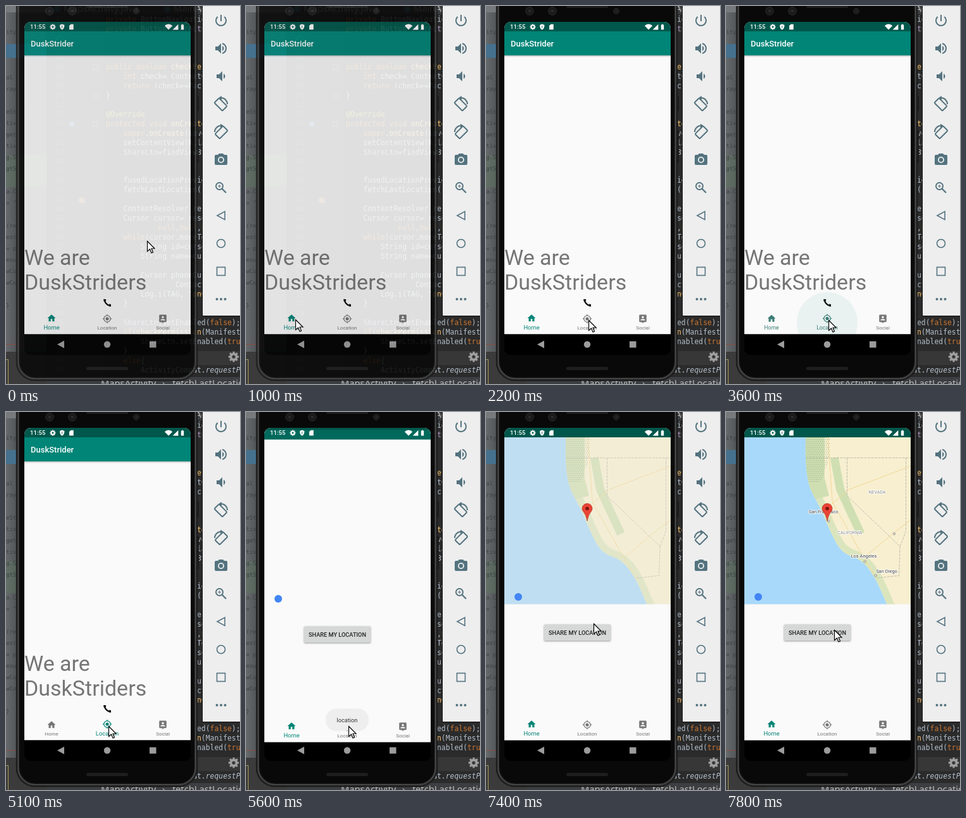
An HTML page with a canvas that plays this animation: 370 by 597 pixels, repeating every 8 s.

```html
<!DOCTYPE html>
<html lang="en">
<head>
<meta charset="utf-8">
<title>Phone emulator</title>
<style>
html, body { margin: 0; width: 100%; height: 100%; overflow: hidden; background: #2b2b2b; }
canvas { display: block; width: 370px; height: 597px; }
</style>
</head>
<body>
<canvas id="stage" width="370" height="597"></canvas>
<script>
const W = 370, H = 597, LOOP = 8000, STEP = 100, TAU = Math.PI * 2;
const TEAL = '#008577', DARK_TEAL = '#00574b', PAPER = '#fafafa', GREY = '#757575', TOOL = '#54737f';
const SCREEN = { x: 29, y: 25, w: 263, bottom: 518.5 };
const stage = document.getElementById('stage').getContext('2d');

const clamp = v => Math.max(0, Math.min(1, v));
const ramp = (t, from, to) => clamp((t - from) / (to - from));
const mix = (a, b, k) => a + (b - a) * k;

function layer() {
  const c = document.createElement('canvas');
  c.width = W; c.height = H;
  return c.getContext('2d');
}
function box(g, x, y, w, h, color) { g.fillStyle = color; g.fillRect(x, y, w, h); }
function disc(g, x, y, r, color) {
  g.fillStyle = color; g.beginPath(); g.arc(x, y, r, 0, TAU); g.fill();
}
function arc(g, x, y, r, from, to, width) {
  g.lineWidth = width; g.beginPath(); g.arc(x, y, r, from, to); g.stroke();
}
function ring(g, x, y, r, color, width) { g.strokeStyle = color; arc(g, x, y, r, 0, TAU, width); }
function path(g, points, close) {
  g.beginPath();
  points.forEach(p => g.lineTo(...p));
  if (close) g.closePath();
}
function shape(g, points, color) { path(g, points, true); g.fillStyle = color; g.fill(); }
function line(g, points, color, width) {
  path(g, points); g.strokeStyle = color; g.lineWidth = width; g.stroke();
}
function rounded(g, x, y, w, h, r) { g.beginPath(); g.roundRect(x, y, w, h, r); }
function hole(g, x, y, r) { g.moveTo(x + r, y); g.arc(x, y, r, 0, TAU); }
function spin(g, x, y, count, draw) {
  for (let i = 0; i < count; i++) {
    g.save(); g.translate(x, y); g.rotate(i * TAU / count); draw(); g.restore();
  }
}
function label(g, str, x, y, font, color, align = 'left') {
  g.font = font; g.fillStyle = color; g.textAlign = align; g.fillText(str, x, y);
}

// Icons live on a 24-unit grid; c is their colour.
function speaker(g, x, c) {
  shape(g, [[x, 9], [x + 4, 9], [x + 9, 4], [x + 9, 20], [x + 4, 15], [x, 15]], c);
  g.beginPath(); g.arc(x + 9, 12, 4.5, -1.1, 1.1); g.fill();
  box(g, x + 9, 4, 2, 16, '#eeeeee');
}
const ICONS = {
  home(g, c) {
    shape(g, [[2, 12], [12, 3], [22, 12]], c);
    box(g, 5, 11, 5, 9, c); box(g, 14, 11, 5, 9, c); box(g, 9, 11, 6, 3, c);
  },
  locate(g, c) {
    disc(g, 12, 12, 4, c);
    ring(g, 12, 12, 8, c, 2);
    spin(g, 12, 12, 4, () => box(g, -1, -11, 2, 3, c));
  },
  social(g, c) {
    rounded(g, 3, 2, 18, 18, 2);
    hole(g, 12, 8, 2.7);
    g.moveTo(6, 16); g.bezierCurveTo(6, 11, 18, 11, 18, 16); g.closePath();
    g.fill('evenodd');
    shape(g, [[9, 20], [15, 20], [12, 23]], c);
  },
  call(g) {
    arc(g, 21, 3, 15.5, Math.PI * .5, Math.PI, 3.5);
    for (const a of [.5, .91]) arc(g, 21, 3, 15, Math.PI * a, Math.PI * (a + .09), 6);
  },
  power(g, c) { arc(g, 12, 12, 8, -.85, Math.PI + .85, 2); box(g, 11, 3, 2, 10, c); },
  louder(g, c) { speaker(g, 3, c); arc(g, 12, 12, 8, -1.3, 1.3, 2); },
  quieter(g, c) { speaker(g, 5, c); },
  camera(g, c) {
    shape(g, [[7, 4], [9, 2], [15, 2], [17, 4]], c);
    rounded(g, 2, 4, 20, 16, 2); hole(g, 12, 12, 5); hole(g, 12, 12, 3.2);
    g.fill('evenodd');
  },
  zoom(g, c) {
    ring(g, 9.5, 9.5, 5.5, c, 2);
    line(g, [[13.5, 13.5], [20, 20]], c, 2.3);
    box(g, 7, 9, 5, 1, c); box(g, 9, 7, 1, 5, c);
  },
  gear(g, c) {
    ring(g, 12, 12, 6, c, 5);
    spin(g, 12, 12, 8, () => box(g, -2, -11, 4, 4, c));
  },
  shield(g) {
    g.beginPath(); g.moveTo(12, 1); g.lineTo(21, 5);
    g.quadraticCurveTo(21, 19, 12, 23); g.quadraticCurveTo(3, 19, 3, 5);
    g.rect(11, 7, 2, 10); g.fill('evenodd');
  },
  card(g, c) { shape(g, [[10, 2], [20, 2], [20, 22], [4, 22], [4, 8]], c); },
  battery(g, c) { box(g, 10, 2, 4, 2, c); box(g, 7, 4, 10, 18, c); },
  wifi(g) { g.beginPath(); g.moveTo(12, 22); g.arc(12, 22, 20, Math.PI * 1.25, Math.PI * 1.75); g.fill(); },
  signal(g, c) { shape(g, [[2, 22], [22, 22], [22, 2]], c); }
};
function icon(g, name, x, y, size, color) {
  g.save();
  g.translate(x - size / 2, y - size / 2);
  g.scale(size / 24, size / 24);
  g.fillStyle = g.strokeStyle = color;
  ICONS[name](g, color);
  g.restore();
}

const CODE = `private BottomNavigationView nav;
private Button ShareLtn;



public boolean checkPermission(
    int check= ContextCompat.check
    return (check==PackageManager
}

@Override
protected void onCreate(Bundle
    super.onCreate(savedInstance
    setContentView(R.layout.maps
    ShareLtn=findViewById(R.id.b


    fusedLocationProviderClient=
    fetchLastLocation();

    ContentResolver resolver=get
    Cursor cursor= resolver.query
            null,null,null,null
    while(cursor.moveToNext()){
        String id=cursor.getStr
        String name=cursor.getS

        Cursor phoneCursor=reso
                ContactsContract
        Log.i(TAG, "onCreate: C
    }

    ShareLtn.setEnabled(false);
    if(checkPermission(Manifest.pe
        ShareLtn.setEnabled(true);
    }
    else{
        ActivityCompat.requestPermis`.split('\n');
const KEYWORD = /^(private|public|protected|boolean|int|return|void|super|null|while|if|else|true|false)$/;
const CODE_FONT = '11.4px "DejaVu Sans Mono", monospace';
const UI_FONT = '14.7px "Noto Sans", sans-serif';

function tokenColor(s) {
  if (s[0] === '@') return '#bbb529';
  if (KEYWORD.test(s)) return '#cc7832';
  if (/^(checkPermission|onCreate)$/.test(s)) return '#ffc66d';
  return s === 'ShareLtn' ? '#b39bc4' : '#b4c0cc';
}
function drawCode(g) {
  CODE.forEach((text, row) => {
    const y = 22 + row * 14.97;
    let x = 158;
    label(g, row + 43, 78, y, CODE_FONT, '#55585a');
    for (const token of text.match(/@?\w+|\W+/g) || []) {
      label(g, token, x, y, (token.startsWith('request') ? 'italic ' : '') + CODE_FONT, tokenColor(token));
      x += g.measureText(token).width;
    }
    if (/^(public|protected|\})/.test(text)) {
      g.strokeStyle = '#6b6b6b'; g.lineWidth = 1;
      g.strokeRect(137.5, Math.round(y) - 3.5, 7, 7);
    }
  });
}
function drawSideWindow(g) {
  const fade = g.createLinearGradient(0, 0, 24, 0);
  fade.addColorStop(0, '#66696b'); fade.addColorStop(1, '#4b4e50');
  box(g, 0, 0, 64, 546, fade);
  box(g, 0, 0, 64, 10, '#767a7c');
  box(g, 0, 60, 64, 22, '#45718f');
  box(g, 0, 236, 64, 50, 'rgba(90,120,95,.4)');
  'ity,,,,al,ray,,eState,tivity,getCo,tivity,g.Sta,gtStr,,a.Co,= ",,(res,estNe,= ph,esult,wCon,wCon,,}'.split(',')
    .forEach((s, i) => label(g, s, 0, 42 + i * 18, '9px "DejaVu Sans Mono", monospace', '#3c4042'));
  box(g, 0, 534, 64, 1, '#8b4a44');
  box(g, 0, 546, 64, 51, '#3b3b3b');
  g.strokeStyle = '#a89b55'; g.lineWidth = 1; g.strokeRect(-5.5, 558.5, 9, 50);
}
function drawEditor(g) {
  g.textBaseline = 'middle';
  box(g, 0, 0, W, H, '#2b2b2b');
  box(g, 64, 0, 90, H, '#313335');
  box(g, 64, 0, W, 13, '#3c3f41');
  for (const [name, x] of [['MapsActivity.java', 91], ['MainActivity', 265]]) {
    disc(g, x - 10, 5, 5, '#4a7f92');
    label(g, name, x, 5, UI_FONT, '#bbb');
  }
  drawCode(g);
  disc(g, 104, 186, 4, '#4a78a0');
  disc(g, 120, 307, 5, '#8f6b45');
  box(g, 300, 545, 70, 22, '#373737');
  icon(g, 'gear', 360, 554, 18, '#a0a0a0');
  box(g, 64, 586, W, 11, '#3c3f41');
  label(g, 'MapsActivity', 150, 597, UI_FONT, '#bbb');
  label(g, '›', 247, 597, UI_FONT, '#bbb');
  label(g, 'fetchLastLocation()', 263, 597, UI_FONT, '#bbb');
  drawSideWindow(g);
}

function drawRotateTool(g, y, flip) {
  g.save();
  g.translate(340, y); g.scale(flip, 1);
  g.strokeStyle = TOOL;
  arc(g, 0, 0, 10, -Math.PI / 2, 0, 2);
  shape(g, [[1, -13], [-4, -10], [1, -7]], TOOL);
  g.rotate(Math.PI / 4);
  rounded(g, -9, -4.5, 18, 10.5, 1.5); g.stroke();
  g.restore();
}
function drawToolbar(g) {
  box(g, 310, 0, 60, 490, '#111');
  box(g, 311, 0, 59, 489, '#eeeeee');
  const row = i => 23 + i * 44;
  ['power', 'louder', 'quieter', '', '', 'camera', 'zoom'].forEach((name, i) => {
    if (name) icon(g, name, 340, row(i), 24, TOOL);
  });
  drawRotateTool(g, row(3), 1);
  drawRotateTool(g, row(4), -1);
  g.strokeStyle = TOOL; g.lineWidth = 1.6;
  path(g, [[334, 331], [346, 324.5], [346, 337.5]], true); g.stroke();
  ring(g, 340, row(8), 6.5, TOOL, 1.6);
  g.strokeRect(333.5, 412.5, 13, 13);
  for (const dx of [-6.500, 0, 6.500]) disc(g, 340 + dx, row(10), 2, TOOL);
}

function drawBody(g) {
  box(g, 302, 142, 3, 24, '#1c1c1c');
  box(g, 302, 196, 3, 52, '#1c1c1c');
  rounded(g, 16, -60, 287, 652, 30);
  g.fillStyle = '#090909'; g.fill();
  ['#1a1a1a', '#383838', '#585858', '#151515'].forEach((color, i) => {
    const inset = .5 + i * 1.6;
    rounded(g, 16 + inset, -60, 287 - inset * 2, 652 - inset, 30 - inset);
    g.strokeStyle = color; g.lineWidth = 1.4; g.stroke();
  });
  for (const x of [69, 105, 206]) {
    const r = x > 200 ? 4.5 : 6.3;
    disc(g, x, 8, r, '#191919');
    ring(g, x, 8, r, '#2c2c2c', 1);
    disc(g, x, 8, r * .4, '#28282e');
  }
  for (const y of [-2, 570]) {
    rounded(g, 127, y, 66, 5, 2.5); g.fillStyle = '#1e1e1e'; g.fill();
  }
}

function drawTab(g, name, text, x, active) {
  const color = `rgb(${[0, 133, 119].map(v => Math.round(mix(117, v, active)))})`;
  icon(g, name, x, 494 - active, 15.4, color);
  label(g, text, x, 508.7, `${mix(8, 9.4, active)}px Roboto, sans-serif`, color, 'center');
}
function drawTabs(g, moved) {
  drawTab(g, 'home', 'Home', 72, 1 - moved);
  drawTab(g, 'locate', 'Location', 160, moved);
  drawTab(g, 'social', 'Social', 248, 0);
}
function drawPage(g, barColor) {
  box(g, SCREEN.x, SCREEN.y, SCREEN.w, SCREEN.bottom - SCREEN.y, PAPER);
  box(g, SCREEN.x, SCREEN.y, SCREEN.w, 15.5, barColor);
}

function drawHome(g, t) {
  drawPage(g, DARK_TEAL);
  box(g, SCREEN.x, 40, SCREEN.w, 38, TEAL);
  const shadow = g.createLinearGradient(0, 78, 0, 81);
  shadow.addColorStop(0, 'rgba(0,0,0,.25)'); shadow.addColorStop(1, 'rgba(0,0,0,0)');
  box(g, SCREEN.x, 78, SCREEN.w, 3, shadow);
  label(g, 'DuskStrider', 39, 60.5, '500 13px Roboto, sans-serif', '#fff');
  g.textBaseline = 'alphabetic';
  ['We are', 'DuskStriders'].forEach((s, i) => label(g, s, 29, 409 + i * 39, '34px Roboto, sans-serif', GREY));
  g.textBaseline = 'middle';
  icon(g, 'call', 160, 469, 15.4, '#000');
  const ripple = t < 3100 ? 0 : 1 - ramp(t, 3500, 3700);
  disc(g, 160, 500, 48, `rgba(0,133,119,${.13 * ripple})`);
  box(g, SCREEN.x, SCREEN.bottom, SCREEN.w, 33, '#000');
  drawTabs(g, t < 3100 ? 0 : t < 5100 ? .5 : 1);
}

// Projects longitude and latitude onto the map area.
const geo = (lon, lat) => [154 + (lon + 122.42) * 15.5, 157 + (37.77 - lat) * 20];
const COAST = [geo(-124.2, 43.8), geo(-124.4, 40.4), geo(-122.6, 37.9), geo(-121.9, 36.5),
  geo(-120.6, 34.5), geo(-118.6, 34), geo(-117.2, 32.7), geo(-115.8, 30.2)];

function coastLine(g) {
  g.beginPath(); g.moveTo(...COAST[0]);
  COAST.slice(1).forEach((p, i) => {
    const next = COAST[i + 2] || p;
    g.quadraticCurveTo(...p, mix(p[0], next[0], .5), mix(p[1], next[1], .5));
  });
}
function drawBorders(g) {
  const corner = geo(-114.6, 35), color = '#b4b0a4';
  g.setLineDash([4, 1.5]);
  line(g, [geo(-125, 42), geo(-113, 42)], color, .8);
  line(g, [geo(-120, 42), geo(-120, 39), corner, geo(-114.7, 32.7), geo(-117.1, 32.5)], color, .8);
  line(g, [geo(-114, 42), geo(-114, 36.2), corner], color, .8);
  g.setLineDash([]);
}
function drawTerrain(g) {
  box(g, 0, 0, W, H, '#a8d9fb');
  coastLine(g);
  g.lineTo(300, 310); g.lineTo(300, 30); g.closePath();
  g.fillStyle = '#f7efd0'; g.fill();
  g.save(); g.clip();
  coastLine(g); g.strokeStyle = '#dbe5bd'; g.lineWidth = 22; g.stroke();
  line(g, [geo(-123.4, 44), geo(-123.4, 40.3), geo(-122.9, 38.8)], '#cfdfb2', 34);
  line(g, [geo(-121.3, 42), geo(-120.7, 39.5), geo(-118.6, 36)], '#cfdfb2', 13);
  for (let y = 40, row = 0; y < 112; y += 3, row++)
    for (let x = 122 + row % 2 * 1.5; x < 163 - Math.max(0, y - 70) * .35; x += 3)
      box(g, x, y, 1.1, 1.1, '#8fae86');
  const road = '#f4d694';
  line(g, [geo(-122, 44), geo(-121.5, 38.5), geo(-118.3, 34.1), geo(-117.1, 32.6)], road, 1);
  line(g, [geo(-118.3, 34.1), geo(-115.2, 36.1), geo(-113, 37.4)], road, 1);
  line(g, [geo(-122.4, 37.8), geo(-119.8, 39.5), geo(-113, 41.5)], road, 1);
  drawBorders(g);
  g.restore();
}
function drawPlaces(g) {
  g.lineJoin = 'round'; g.lineWidth = 2; g.textAlign = 'center';
  g.strokeStyle = 'rgba(255,255,255,.85)';
  for (const [name, x, y] of [['San Francisco', 154, 157.5], ['NEVADA', 239, 126.5],
    ['CALIFORNIA', 196, 190.5], ['Los Angeles', 218, 228], ['San Diego', 254, 252]]) {
    const state = name === name.toUpperCase();
    g.font = `${state ? 7 : 7.5}px Roboto, sans-serif`;
    g.fillStyle = state ? '#8a8a8a' : '#444';
    g.strokeText(name, x, y); g.fillText(name, x, y);
  }
  for (const [x, y] of [geo(-121.9, 37), geo(-118.2, 33.8), geo(-117.1, 32.7), geo(-115.2, 36)]) {
    disc(g, x, y, 1.6, '#fff'); ring(g, x, y, 1.6, '#666', .8);
  }
}
function drawPin(g) {
  g.fillStyle = '#ea4335'; g.strokeStyle = '#b5281d'; g.lineWidth = .7;
  g.beginPath();
  g.arc(160, 152.5, 8, Math.PI * .9, Math.PI * .1);
  g.quadraticCurveTo(161, 163, 160, 172);
  g.quadraticCurveTo(159, 163, 152.4, 155);
  g.closePath(); g.fill(); g.stroke();
  disc(g, 160, 152.5, 2.8, '#7d150d');
}

function drawMapPage(g, t) {
  drawPage(g, t < 5700 ? '#00695c' : DARK_TEAL);
  const tiles = ramp(t, 7200, 7500), places = ramp(t, 7400, 7600);
  if (t >= 6100) box(g, SCREEN.x, 40, SCREEN.w, 263.5, '#ece9e1');
  if (tiles) {
    g.save();
    g.beginPath(); g.rect(SCREEN.x, 40, SCREEN.w, 263.5); g.clip();
    g.globalAlpha = tiles; g.drawImage(terrain.canvas, 0, 0);
    g.globalAlpha = places; drawPlaces(g);
    g.restore();
  }
  if (t >= 7000) drawPin(g);
  disc(g, 51, 292, 6, '#4285f4');
  g.save();
  g.shadowColor = 'rgba(0,0,0,.4)'; g.shadowBlur = 3; g.shadowOffsetY = 1;
  rounded(g, 92, 335.5, 105, 25.5, 1.5);
  g.fillStyle = '#d6d7d7'; g.fill();
  g.restore();
  label(g, 'SHARE MY LOCATION', 144.5, 349, '500 9.2px Roboto, sans-serif', '#222', 'center');
  drawTabs(g, 0);
}

function drawSystemBars(g) {
  label(g, '11:55', 38, 33.5, '500 9.6px Roboto, sans-serif', '#fff');
  ['gear', 'shield', 'card'].forEach((name, i) => icon(g, name, 74 + i * 14.7, 33, 10, '#fff'));
  ['wifi', 'signal', 'battery'].forEach((name, i) => icon(g, name, 257 + i * 11, 33, 10.5, '#fff'));
  const key = '#9c9c9c';
  shape(g, [[81, 534.5], [92, 528.5], [92, 540.5]], key);
  disc(g, 160, 534.5, 5.2, key);
  box(g, 227, 529.5, 10.5, 10, key);
}
function drawToast(g, alpha) {
  g.save();
  g.globalAlpha = alpha;
  g.shadowColor = 'rgba(0,0,0,.12)'; g.shadowBlur = 2;
  rounded(g, 127, 469.5, 66, 33.5, 16);
  g.fillStyle = '#eeeeee'; g.fill();
  g.shadowColor = 'transparent';
  label(g, 'location', 160, 487, '9.2px Roboto, sans-serif', '#333', 'center');
  g.restore();
}

function drawPhone(g, t) {
  g.clearRect(0, 0, W, H);
  g.textBaseline = 'middle';
  drawBody(g);
  g.save();
  rounded(g, SCREEN.x, SCREEN.y, SCREEN.w, 526, 10); g.clip();
  box(g, SCREEN.x, SCREEN.bottom, SCREEN.w, 33, '#000');
  if (t < 5800) drawHome(g, t);
  if (t >= 5300) {
    g.save();
    g.globalAlpha = ramp(t, 5150, 5450);
    g.translate(0, Math.round(22 * (1 - ramp(t, 5300, 5800)) ** 2.2));
    drawMapPage(g, t);
    g.restore();
  }
  drawSystemBars(g);
  drawToast(g, Math.min(ramp(t, 5300, 5600), 1 - ramp(t, 6000, 6200)));
  g.restore();
}

// Resting points of the pointer: [time, x, y]
const POINTER = [[0, 223, 371], [600, 91, 493], [800, 91, 493], [1200, 65, 496], [1900, 162, 496],
  [6100, 162, 496], [6200, 162, 481], [6900, 167, 323], [7200, 170, 331], [LOOP - STEP * 2, 171, 344], [LOOP, 171, 344]];
function drawPointer(g, t) {
  const i = POINTER.findIndex(p => p[0] > t);
  const a = POINTER[i - 1], b = POINTER[i];
  const k = ramp(t, a[0], b[0]), e = k * k * (3 - 2 * k);
  g.save();
  g.translate(Math.round(mix(a[1], b[1], e)) + .5, Math.round(mix(a[2], b[2], e)) + .5);
  path(g, [[0, 0], [0, 16], [4, 12.5], [6.5, 18.5], [9, 17.5], [6.5, 11.5], [11.5, 11.5]], true);
  g.fillStyle = '#fff'; g.fill();
  g.strokeStyle = '#000'; g.lineWidth = 1.2; g.stroke();
  g.restore();
}

const editor = layer(), phone = layer(), terrain = layer();
drawEditor(editor);
drawToolbar(editor);
drawTerrain(terrain);

function render(t) {
  drawPhone(phone, t);
  stage.drawImage(editor.canvas, 0, 0);
  stage.globalAlpha = t < 2200 ? .87 : 1;
  stage.drawImage(phone.canvas, 0, 0);
  stage.globalAlpha = 1;
  drawPointer(stage, t);
}

const start = performance.now();
let shown = -1;
function tick() {
  const t = Math.floor((performance.now() - start) % LOOP / STEP) * STEP;
  if (t !== shown) render(shown = t);
  requestAnimationFrame(tick);
}
tick();
</script>
</body>
</html>
```
